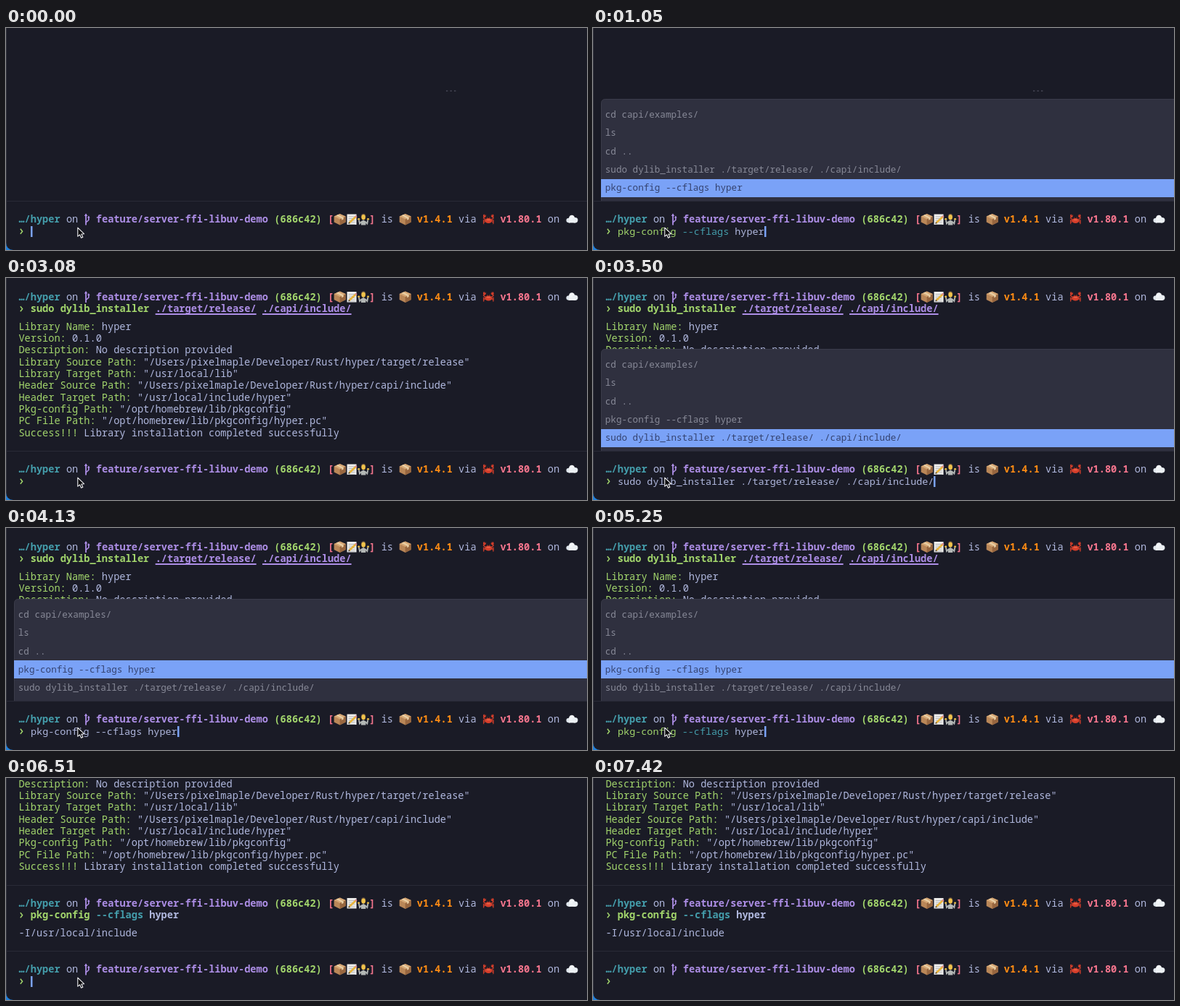
Recreate the animation shown at these times as an HTML page with a canvas. Size 800 px wide and 307 px high, loop 7560 ms.

```html
<!DOCTYPE html>
<html lang="en">
<head>
<meta charset="utf-8">
<title>Terminal session</title>
<style>
  html, body { margin: 0; width: 100%; height: 100%; overflow: hidden; background: #1a1b26; }
  canvas { display: block; }
</style>
</head>
<body>
<canvas id="stage" width="800" height="307"></canvas>
<script>
const ctx = document.getElementById('stage').getContext('2d');
const LOOP = 7560, LEFT = 17.4, CELL = 8.185, LINE = 16.34;
const C = {
  bg: '#1a1b26', rule: '#292a37', text: '#b0b8de', teal: '#449dab', green: '#a2d56c',
  purple: '#ad8ee6', red: '#f7768e', orange: '#ff8c14', blue: '#7aa2f7',
  menu: '#2f303f', menuText: '#888a98', picked: '#34426f'
};
const SIZE = { out: 13.64, input: 13.45, menu: 12.6 };

const SUDO = [['sudo dylib_installer ', C.green], ['./target/release/', C.teal], [' '], ['./capi/include/', C.teal]];
const PKG = [['pkg-config ', C.green], ['--cflags ', C.teal], ['hyper', C.text]];
const plain = runs => runs.map(r => r[0]).join('');
const HISTORY = ['cd capi/examples/', 'ls', 'cd ..'];
const REPORT = [
  ['Library Name:', ' hyper'],
  ['Version:', ' 0.1.0'],
  ['Description:', ' No description provided'],
  ['Library Source Path:', ' "/Users/pixelmaple/Developer/Rust/hyper/target/release"'],
  ['Library Target Path:', ' "/usr/local/lib"'],
  ['Header Source Path:', ' "/Users/pixelmaple/Developer/Rust/hyper/capi/include"'],
  ['Header Target Path:', ' "/usr/local/include/hyper"'],
  ['Pkg-config Path:', ' "/opt/homebrew/lib/pkgconfig"'],
  ['PC File Path:', ' "/opt/homebrew/lib/pkgconfig/hyper.pc"'],
  ['Success!!!', ' Library installation completed successfully']
];

const col = n => LEFT + n * CELL;
const within = (t, ...spans) => spans.some(([a, b]) => t >= a && t < b);

function text(str, x, y, color = C.text, bold = false, size = SIZE.out) {
  ctx.font = `${bold ? 700 : 500} ${size}px "Noto Sans Mono", "DejaVu Sans Mono", monospace`;
  ctx.fillStyle = color;
  ctx.fillText(str, x, y + 4.5);
  return x + ctx.measureText(str).width;
}

function runs(list, x, y, bold, size, override) {
  for (const [str, color] of list) x = text(str, x, y, override || color, bold, size);
  return x;
}

function poly(points, fill, stroke, width = 1) {
  ctx.beginPath();
  for (let i = 0; i < points.length; i += 2) ctx.lineTo(points[i], points[i + 1]);
  if (fill) { ctx.closePath(); ctx.fillStyle = fill; ctx.fill(); }
  if (stroke) { ctx.strokeStyle = stroke; ctx.lineWidth = width; ctx.stroke(); }
}

function dot(x, y, rx, ry, fill) {
  ctx.beginPath();
  ctx.ellipse(x, y, rx, ry, 0, 0, Math.PI * 2);
  ctx.fillStyle = fill;
  ctx.fill();
}

function rect(x, y, w, h, fill) {
  ctx.fillStyle = fill;
  ctx.fillRect(x, y, w, h);
}

function at(x, y, draw) {
  ctx.save();
  ctx.translate(x, y);
  draw();
  ctx.restore();
}

function parcel() {
  poly([0, -4, 8, -7.5, 16, -4, 16, 4, 8, 8, 0, 4], '#b98758');
  poly([8, 0, 16, -4, 16, 4, 8, 8], '#97663f');
  poly([0, -4, 8, -7.5, 16, -4, 8, 0], '#d5a775');
  poly([3, -5.3, 5.5, -6.4, 13, -2.5, 13, 0, 10.5, 1.2, 10.5, -1.3], '#e9cfa5');
}

function memo() {
  rect(1.5, -7, 13, 14.5, '#eeeeec');
  for (let y = -4; y < 7; y += 2.6) rect(3.5, y, 9, 0.8, '#a9aaad');
  poly([4.5, 5, 13.5, -3.5], null, '#e8b43c', 2.6);
  poly([3, 6.5, 4, 3.7, 5.8, 5.6], '#4b443e');
  poly([13, -3, 14.6, -4.5], null, '#e08793', 2.6);
}

function shrug() {
  poly([4.8, 8, 4.5, 3, 8, 1, 11.5, 3, 11.2, 8], '#b4b8b6');
  poly([5, 3.5, 2.8, 6, 1.8, 1], null, '#b4b8b6', 1.8);
  poly([11, 3.5, 13.2, 6, 14.2, 1], null, '#b4b8b6', 1.8);
  dot(8, -3.9, 3.2, 3.8, '#65503d');
  dot(8, -2.8, 2.7, 3.6, '#f0c34b');
  dot(1.6, -0.2, 1.5, 1.3, '#f0c34b');
  dot(14.4, -0.2, 1.5, 1.3, '#f0c34b');
}

function crab() {
  const red = '#d63f2b';
  for (const s of [-1, 1]) {
    const x = n => 8 + s * n;
    for (let i = 0; i < 3; i++) poly([x(4), 1 + i, x(7), 1 + 2 * i, x(6.4), 4 + 1.4 * i], null, red, 0.9);
    poly([x(4), 0, x(6.8), -1.5, x(5.8), -4], null, red, 1.3);
    dot(x(5.4), -4.7, 1.9, 2.3, red);
    poly([x(4.2), -7.5, x(4.4), -4.2, x(5.8), -7.4], C.bg);
    poly([x(1.5), -1, x(1.7), -3], null, red, 0.9);
    dot(x(1.7), -3, 0.9, 1, '#3b2021');
  }
  dot(8, 2, 4.9, 3.4, red);
  dot(8, 0.8, 3, 1, '#ea6046');
}

function cloud() {
  dot(4, 1.6, 4, 3.3, '#dfe6ec');
  dot(7.7, -1.2, 4.1, 4.6, '#f3f6f8');
  dot(12, 1.2, 4, 3.7, '#e9eef2');
  rect(3.5, 0.5, 9, 4.4, '#edf1f4');
}

function branch() {
  poly([2.6, -7, 2.6, 8], null, C.purple, 1.8);
  poly([2.6, 4.5, 6.4, 1, 6.4, -3], null, C.purple, 1.6);
  poly([4.4, -2, 6.4, -5, 8.2, -2], C.purple);
  poly([0.3, -4.5, 2.6, -8, 4.9, -4.5], C.purple);
}

function chevron(y) {
  poly([19.8, y - 3.5, 22.6, y, 19.8, y + 3.5], null, C.green, 1.5);
}

function prompt(y) {
  const put = (n, str, color, bold = true) => text(str, col(n), y, color, bold);
  put(0, '…/hyper', C.teal);
  put(8, 'on', C.text, false);
  at(col(11), y, branch);
  put(13, 'feature/server-ffi-libuv-demo', C.purple);
  put(43, '(686c42)', C.green);
  put(52, '[', C.red);
  at(col(53) + 0.5, y, parcel);
  at(col(55) + 0.5, y, memo);
  at(col(57) + 0.2, y, shrug);
  put(59, ']', C.red);
  put(61, 'is', C.text, false);
  at(col(64) + 0.5, y, parcel);
  put(67, 'v1.4.1', C.orange);
  put(74, 'via', C.text, false);
  at(col(78) + 0.5, y, crab);
  put(81, 'v1.80.1', C.red);
  put(89, 'on', C.text, false);
  at(col(92) + 1, y, cloud);
  chevron(y + 16.7);
}

function rule(y) {
  rect(1, Math.round(y), 799, 1, C.rule);
}

function installBlock(y, withReport) {
  prompt(y);
  const cy = y + 16.5;
  text('sudo dylib_installer', col(2), cy, C.green, true);
  for (const [n, path] of [[23, SUDO[1][0]], [41, SUDO[3][0]]]) {
    const end = text(path, col(n), cy, C.purple, true);
    rect(col(n), Math.round(cy + 6.4), end - col(n), 2, C.purple);
  }
  if (!withReport) return;
  REPORT.forEach(([label, value], i) => {
    const ly = y + 41 + i * LINE;
    text(value, text(label, LEFT, ly, C.green), ly);
  });
  rule(y + 213);
}

function flagsBlock(y) {
  prompt(y);
  runs(PKG, col(2), y + 16.5, true, SIZE.out);
  text('-I/usr/local/include', LEFT, y + 41.5);
}

function menu(latest, selected) {
  ctx.beginPath();
  ctx.roundRect(11.5, 98.5, 800, 141, [5, 0, 0, 0]);
  ctx.fillStyle = C.menu;
  ctx.fill();
  ctx.strokeStyle = '#3b3c4a';
  ctx.lineWidth = 1;
  ctx.stroke();
  [...HISTORY, ...latest].forEach((item, i) => {
    const y = 119.3 + i * 25.35;
    if (i === selected) rect(11, Math.round(y - 12), 789, 25, C.blue);
    text(item, 16.8, y, i === selected ? C.picked : C.menuText, false, SIZE.menu);
  });
}

function dots() {
  for (let i = 0; i < 3; i++) rect(606 + i * 5.5, 86, 2.4, 2, '#3a3b48');
}

function pointer() {
  at(98.8, 276.2, () => {
    ctx.lineJoin = 'round';
    poly([0, 0, 0, 12, 2.8, 9.6, 4.8, 14, 7, 13, 5.1, 8.8, 8.7, 8.5, 0, 0], '#08080c', '#f2f2f4', 1.1);
  });
}

function windowEdge() {
  rect(0, 0, 1, 307, '#32333f');
  ctx.beginPath();
  ctx.moveTo(0, 297);
  ctx.quadraticCurveTo(0.5, 306.5, 10, 307);
  ctx.lineTo(0, 307);
  ctx.fillStyle = '#2380d8';
  ctx.fill();
}

function inputLine(t) {
  let x = 34, typed = null, colored = true;
  if (within(t, [1050, 1610], [4130, 5460])) {
    typed = PKG;
    colored = !within(t, [4130, 4270]);
  } else if (within(t, [1610, 2100], [3500, 4130])) {
    typed = SUDO;
    colored = !within(t, [1610, 1680], [3500, 3640]);
  }
  if (typed) x = runs(typed, x, 281, false, SIZE.input, colored ? null : C.text);
  const lit = within(t, [0, 560], [1050, 2030], [2240, 2730], [3220, 3990],
    [4130, 4690], [5180, 5390], [5460, 5950], [6440, 6930]);
  if (lit) rect(Math.round(x), 274, 2.5, 15, C.blue);
}

function draw(t) {
  rect(0, 0, 800, 307, C.bg);
  const running = within(t, [2100, 2240]);

  if (t < 2100) dots();
  if (running) installBlock(264.5, false);
  else if (within(t, [2240, 5460])) installBlock(26, true);
  else if (t >= 5460) {
    installBlock(-65.5, true);
    flagsBlock(173);
  }

  const names = [plain(SUDO), plain(PKG)];
  if (within(t, [1050, 2030])) menu(names, t < 1610 ? 4 : 3);
  if (within(t, [3500, 5390])) menu(names.reverse(), t < 4130 ? 4 : 3);

  if (!running) {
    rect(0, 239, 800, 68, C.bg);
    rule(239);
    prompt(264.5);
    inputLine(t);
  }
  windowEdge();
  if (t < 7000) pointer();
}

const start = performance.now();
function frame() {
  draw((performance.now() - start) % LOOP);
  requestAnimationFrame(frame);
}
frame();
</script>
</body>
</html>
```
